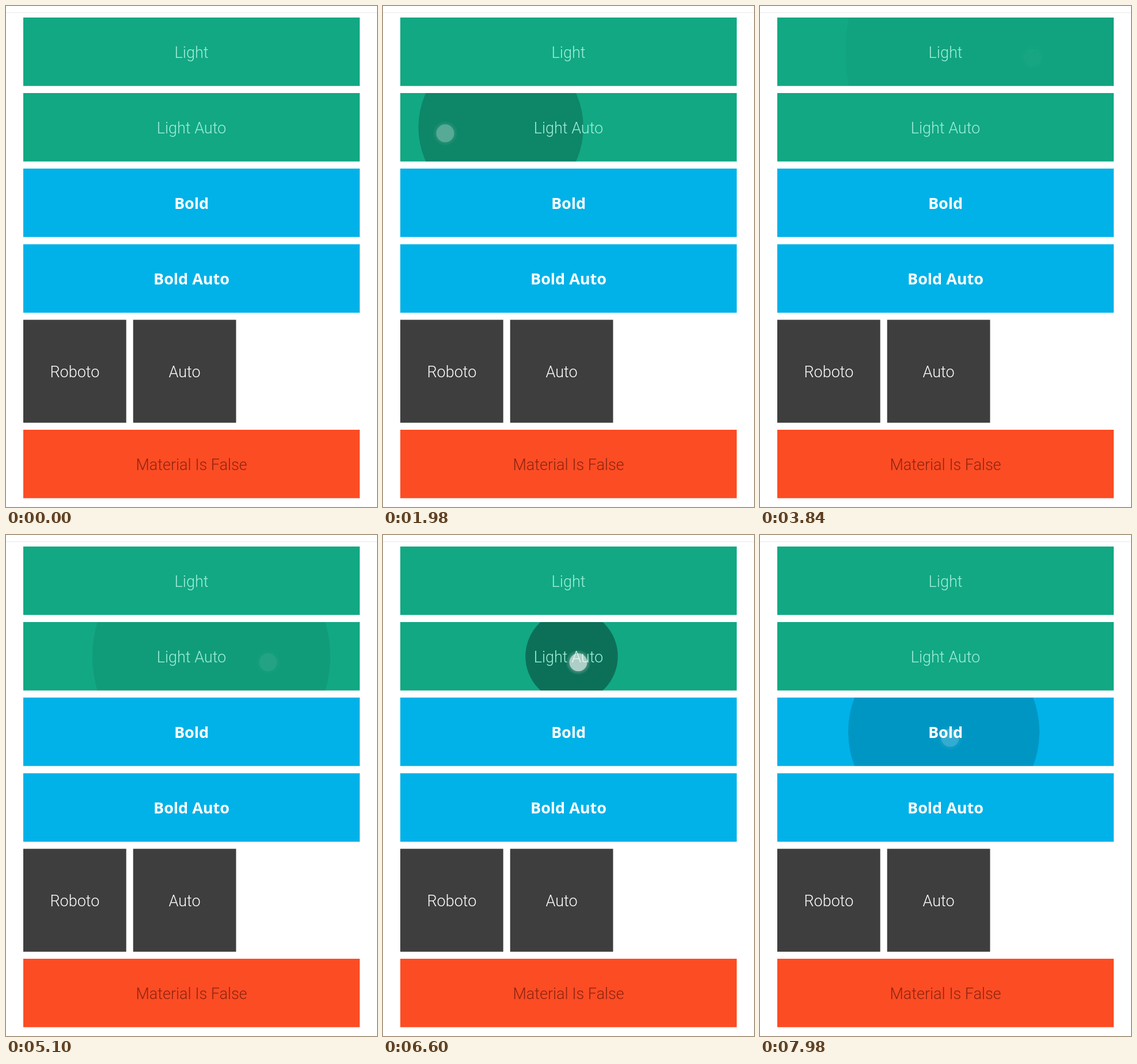
An HTML page with a canvas for the animation above (8 s loop, 644 by 869 pixels).

```html
<!DOCTYPE html>
<html lang="en">
<head>
<meta charset="utf-8">
<title>Button ripples</title>
<style>
  html, body { margin: 0; width: 100%; height: 100%; overflow: hidden; background: #fff; }
  canvas { display: block; }
</style>
</head>
<body>
<canvas id="stage" width="644" height="869"></canvas>
<script>
const ctx = document.getElementById('stage').getContext('2d');
const LOOP = 8000, STEP = 60, RIPPLE_MS = 1200;
const LIGHT = '300 27px Roboto, sans-serif';
const BOLD = '700 27px "Open Sans", sans-serif';

const button = (label, y, fill, ink, font = LIGHT, x = 30, w = 584, h = 118.7) =>
  ({ label, x, y, w, h, fill, ink, font });

const buttons = [
  button('Light', 20, '#12a883', '#a0efd9'),
  button('Light Auto', 151, '#12a883', '#a0efd9'),
  button('Bold', 282, '#00b2e8', '#fff', BOLD),
  button('Bold Auto', 413.3, '#00b2e8', '#fff', BOLD),
  button('Roboto', 544.3, '#3e3e3e', '#fff', LIGHT, 30, 178.7, 178.5),
  button('Auto', 544.3, '#3e3e3e', '#fff', LIGHT, 220.7, 178.7, 178.5),
  button('Material Is False', 735, '#fc4c24', '#8e2410')
];

// Each ripple drifts from x to end while it grows to radius r.
const tap = (at, target, x, end, r) => ({ at, target, x, end, r });
const taps = [
  tap(412, 0, 186, 186, 345),
  tap(1672, 1, 108, 272, 243),
  tap(3110, 0, 473, 473, 345),
  tap(4538, 1, 455, 339, 243),
  tap(5500, 0, 415, 415, 345),
  tap(6450, 1, 339, 304, 243),
  tap(7598, 2, 330, 314, 243)
];

function disc(x, y, r, fill) {
  ctx.fillStyle = fill;
  ctx.beginPath();
  ctx.arc(x, y, r, 0, Math.PI * 2);
  ctx.fill();
}

function drawRipple({ at, target, x, end, r }, time) {
  const u = (time - at) / RIPPLE_MS;
  if (u <= 0 || u >= 1) return;
  const b = buttons[target], p = 1 - (1 - u) ** 3;
  ctx.save();
  ctx.beginPath();
  ctx.rect(b.x, b.y, b.w, b.h);
  ctx.clip();
  disc(x + (end - x) * p, b.y + b.h / 2, r * p, `rgba(0,0,0,${0.5 * (1 - p)})`);
  ctx.restore();
}

function drawLabel({ label, x, y, w, h, ink, font }) {
  ctx.font = font;
  ctx.fillStyle = ink;
  ctx.textAlign = 'center';
  ctx.fillText(label, x + w / 2, y + h / 2 + 10.5);
}

function drawTouch({ at, target, x }, time) {
  const age = time - at;
  if (age < -150 || age > 750) return;
  const alpha = Math.min(0.8, (age + 150) / 110, 0.7 * Math.exp((150 - age) / 175));
  const b = buttons[target], y = b.y + b.h / 2 + 10.5;
  const glow = ctx.createRadialGradient(x, y, 15, x, y, 22);
  glow.addColorStop(0, `rgba(255,255,255,${alpha * 0.35})`);
  glow.addColorStop(1, 'rgba(255,255,255,0)');
  disc(x, y, 22, glow);
  disc(x, y, 15.5, `rgba(255,255,255,${alpha * 0.8})`);
}

function draw(time) {
  ctx.fillStyle = '#fff';
  ctx.fillRect(0, 0, 644, 869);
  ctx.fillStyle = '#e9e9e9';
  ctx.fillRect(0, 11, 644, 1);
  for (const b of buttons) {
    ctx.fillStyle = b.fill;
    ctx.fillRect(b.x, b.y, b.w, b.h);
  }
  taps.forEach(t => drawRipple(t, time));
  buttons.forEach(drawLabel);
  taps.forEach(t => drawTouch(t, time));
}

const start = performance.now();
function tick() {
  const time = (performance.now() - start) % LOOP;
  draw(Math.floor(time / STEP) * STEP);
  requestAnimationFrame(tick);
}
tick();
</script>
</body>
</html>
```
